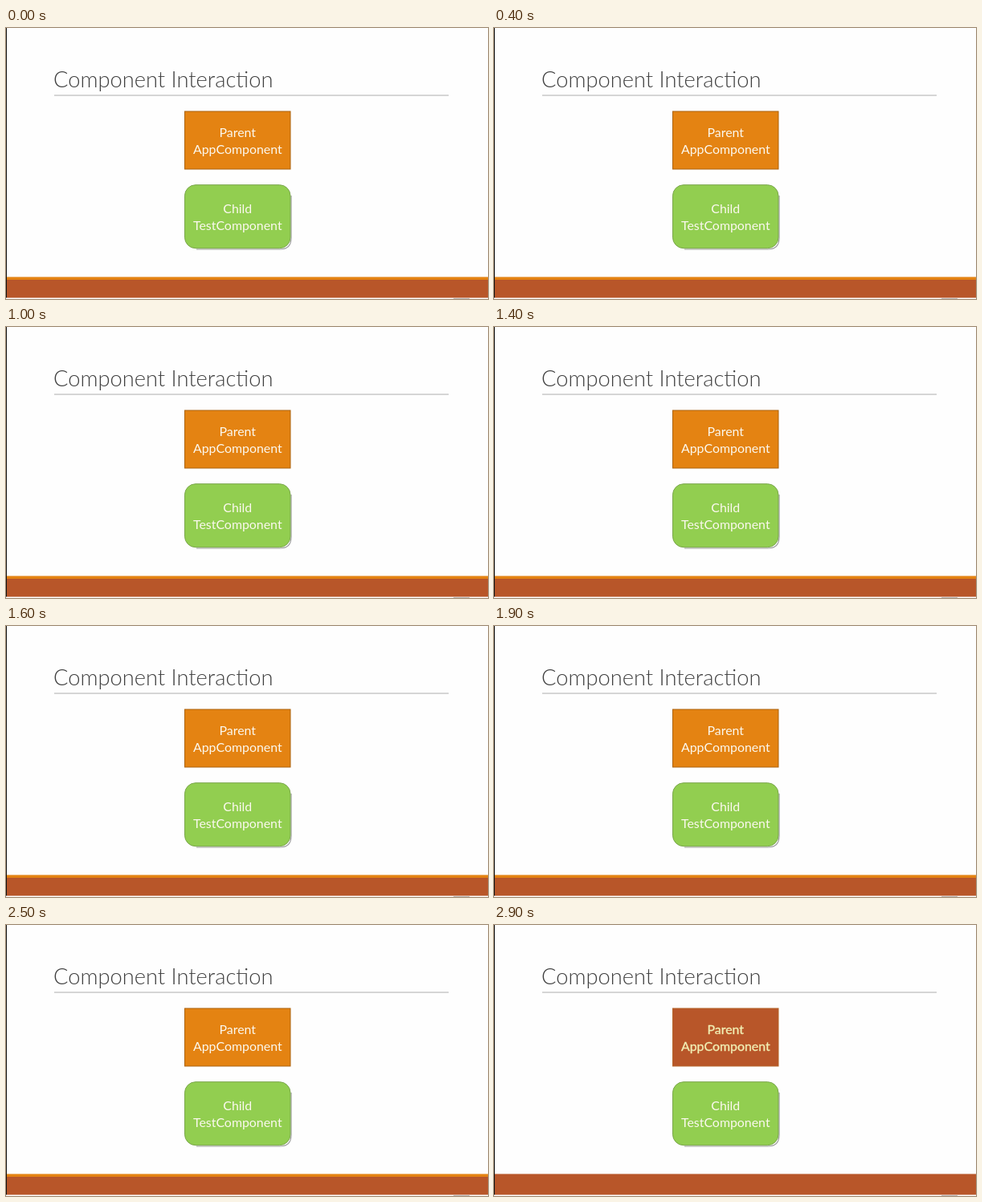
An HTML page for the animation above (3 s loop, 600 by 338 pixels).

```html
<!DOCTYPE html>
<html lang="en">
<head>
<meta charset="utf-8">
<title>Component Interaction</title>
<style>
  html, body { margin: 0; width: 100%; height: 100%; overflow: hidden; background: #fefefe; }
  svg { display: block; width: 600px; height: 338px; }
  text { font-family: Lato, Carlito, sans-serif; }
  .title { font-size: 27.3px; font-weight: 300; fill: #404040; }
  .label { font-size: 15.9px; text-anchor: middle; fill: #fbf8ee; }
  .parent rect { fill: #e48312; stroke: #ab620f; }
  .child rect { fill: #92ce50; stroke: #79a64b; }
  .strip { fill: #e48312; }
  .dark .parent rect { fill: #b85629; stroke: #b5642a; }
  .dark .parent text { fill: #f1efb4; stroke: #f1efb4; stroke-width: .35px; }
  .dark .strip { fill: #b85629; }
</style>
</head>
<body>
<svg id="slide" viewBox="0 0 600 338">
  <rect width="600" height="338" fill="#fefefe"/>
  <text class="title" x="59" y="74">Component Interaction</text>
  <path d="M60 84H551" stroke="#adadad"/>

  <g class="parent">
    <rect x="222.5" y="104" width="131.5" height="72"/>
    <text class="label" x="288.3" y="136">Parent</text>
    <text class="label" x="288.3" y="157">AppComponent</text>
  </g>

  <g class="child">
    <path d="M237 276H341Q355 276 355 262V209" fill="none" stroke="#777" stroke-opacity=".7" stroke-width="1.2"/>
    <rect x="222.5" y="195.7" width="131.5" height="79" rx="13.5"/>
    <text class="label" x="288.3" y="231">Child</text>
    <text class="label" x="288.3" y="252">TestComponent</text>
  </g>

  <rect class="strip" x="1" y="310.5" width="599" height="4"/>
  <rect x="1" y="314" width="599" height="22.5" fill="#b85629"/>
  <path d="M557 337.5H577" stroke="#bbb"/>
  <rect width="1" height="336.5" fill="#111"/>
</svg>
<script>
  const LOOP = 3000, DARK_FROM = 2900;
  const slide = document.getElementById("slide");

  function draw(now) {
    slide.classList.toggle("dark", now % LOOP >= DARK_FROM);
    requestAnimationFrame(draw);
  }
  draw(0);
</script>
</body>
</html>
```
